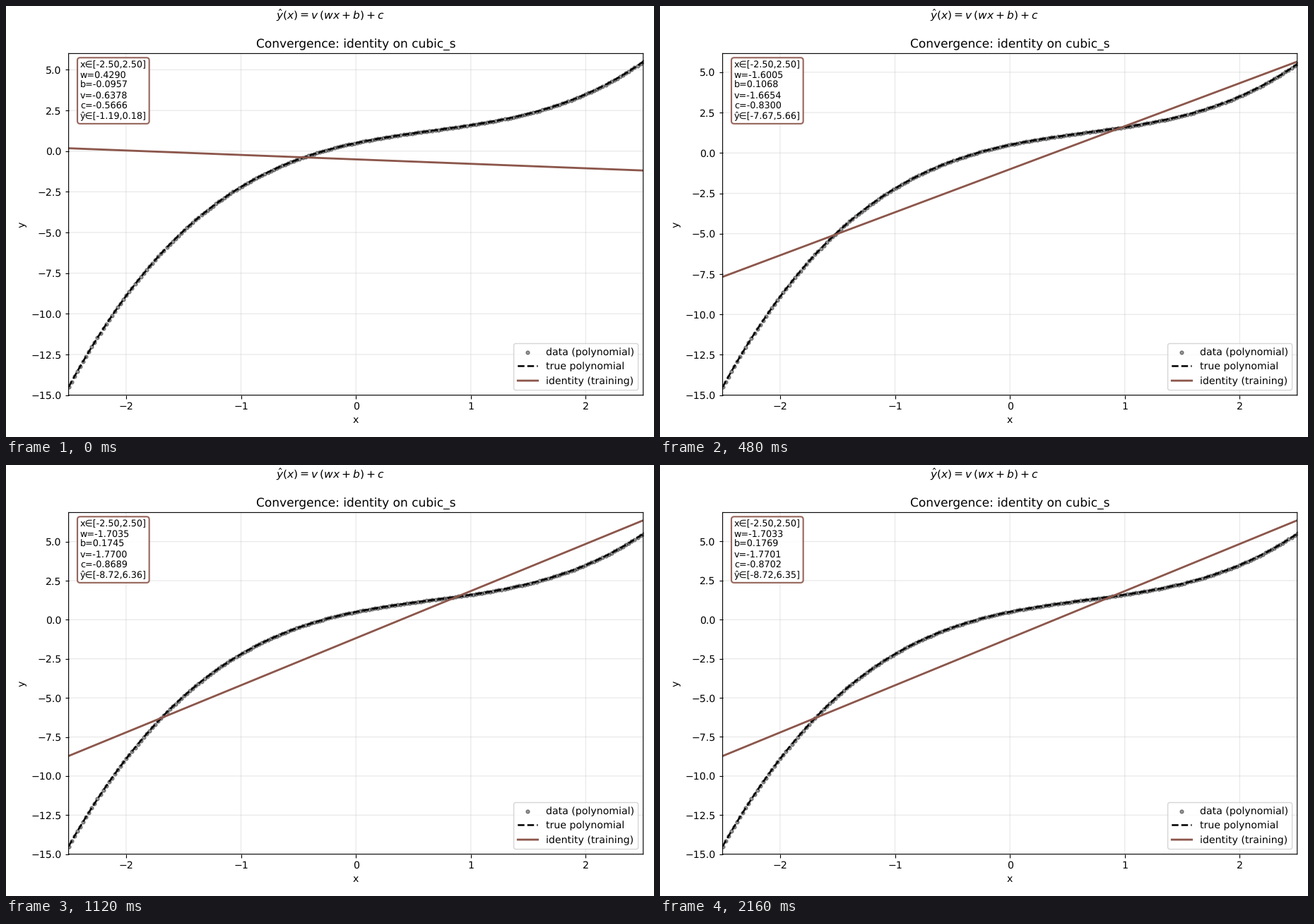
These frames come from a looping animation (917 by 611 pixels, 3.29 s). A matplotlib script:

```python
import numpy as np
import matplotlib.pyplot as plt
from matplotlib.animation import FuncAnimation

W, H, DPI = 917, 611, 101.87
LOOP, INTERVAL, HOLD = 3290, 14, 80   # ms
SNAPSHOTS, STEPS, RATE = 28, 25, 0.004
BROWN = "#8c564b"

# Smooth rendering: no pixel fitting of glyphs or lines.
plt.rcParams.update({
    "font.family": "DejaVu Sans",
    "text.hinting": "none",
    "path.snap": False,
})

x = np.linspace(-2.5, 2.5, 200)
y = 0.4 * x**3 - 0.8 * x**2 + 1.5 * x + 0.5


def predict(params):
    w, b, v, c = params
    return v * (w * x + b) + c


def train(params):
    """Full-batch gradient descent on half the mean squared error."""
    for _ in range(STEPS):
        w, b, v, _c = params
        err = predict(params) - y
        s0, sx = err.mean(), (err * x).mean()
        params = params - RATE * np.array([v * sx, v * s0, w * sx + b * s0, s0])
    return params


history = [np.array([0.4290, -0.0957, -0.6378, -0.5666])]
while len(history) < SNAPSHOTS:
    history.append(train(history[-1]))

# The tiny excess keeps the pixel size from rounding down.
fig = plt.figure(figsize=((W + 0.001) / DPI, (H + 0.001) / DPI), dpi=DPI)
left, right, top, bottom = 88.6, 901.7, 67.4, 551.7
ax = fig.add_axes([left / W, 1 - bottom / H, (right - left) / W, (bottom - top) / H])

fig.text(0.5, 1 - 17.7 / H, r"$\hat{y}(x) = v\,(w x + b) + c$",
         fontsize=11, ha="center", va="baseline")
ax.set_title("Convergence: identity on cubic_s")
ax.set_xlabel("x")
ax.set_ylabel("y")
ax.set_xlim(-2.5, 2.5)
ax.grid(True, alpha=0.3)

ax.scatter(x, y, s=12, color="black", alpha=0.4, label="data (polynomial)")
ax.plot(x, y, "--", color="black", lw=1.8, label="true polynomial")
fit, = ax.plot(x, x, color=BROWN, lw=2, label="identity (training)")
ax.legend(loc="lower right")

info = ax.text(0.02, 0.98, "", transform=ax.transAxes, fontsize=9, va="top",
               bbox=dict(boxstyle="round,pad=0.3", facecolor="white",
                         edgecolor=BROWN, lw=1.5, alpha=0.9))


def update(i):
    # Each frame shows the state reached by the end of its interval.
    k = min((i * INTERVAL + INTERVAL - 1) // HOLD, SNAPSHOTS - 1)
    w, b, v, c = history[k]
    yhat = predict(history[k])
    fit.set_ydata(yhat)
    ax.set_ylim(min(y.min(), yhat.min()) - 0.5, max(y.max(), yhat.max()) + 0.5)
    info.set_text(
        f"x∈[{x[0]:.2f},{x[-1]:.2f}]\n"
        f"w={w:.4f}\nb={b:.4f}\nv={v:.4f}\nc={c:.4f}\n"
        f"ŷ∈[{yhat.min():.2f},{yhat.max():.2f}]"
    )
    return fit, info


anim = FuncAnimation(fig, update, frames=LOOP // INTERVAL, interval=INTERVAL,
                     repeat=True, repeat_delay=0)
plt.show()
```
